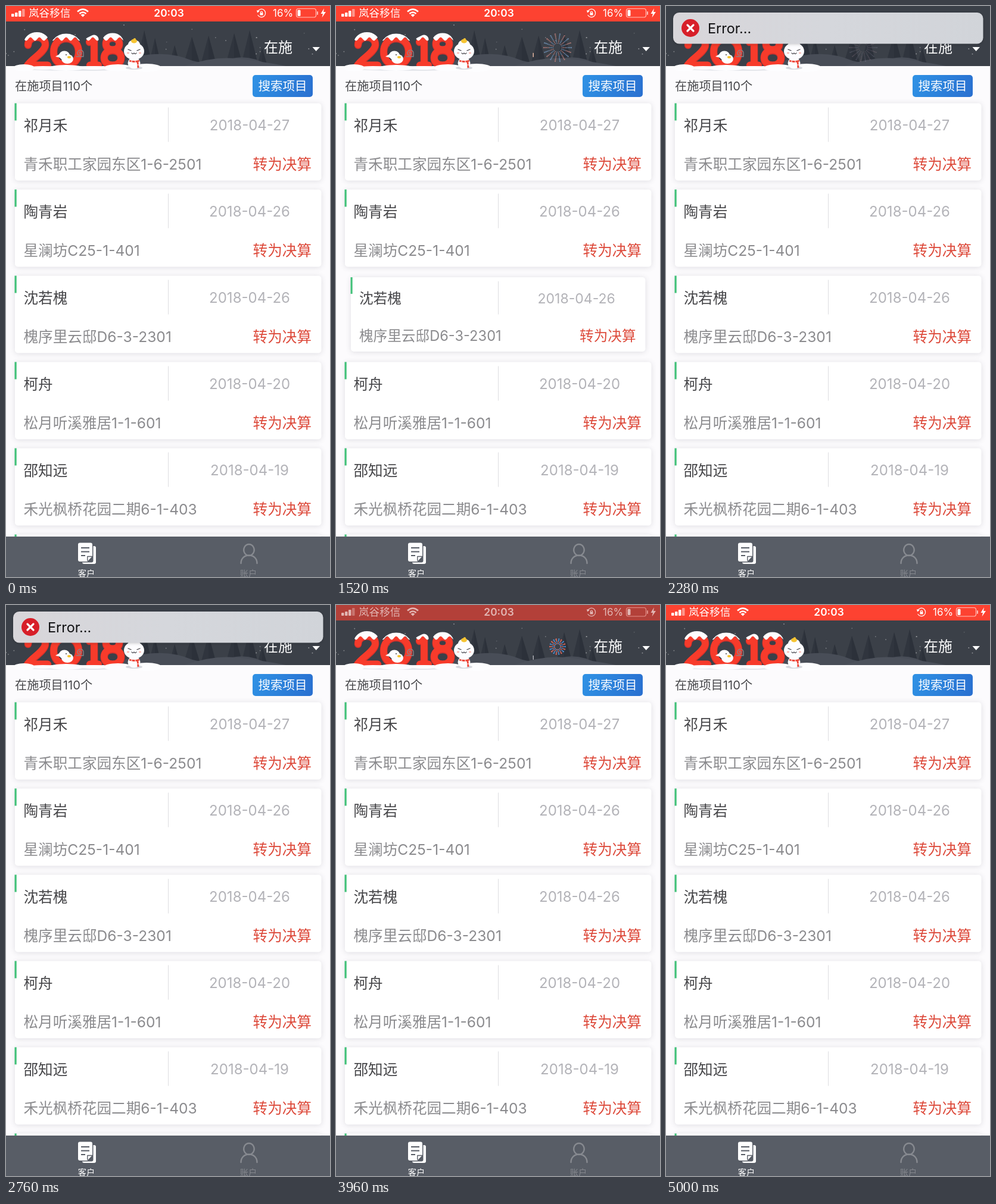
An HTML page with a canvas for the animation above (5.04 s loop, 544 by 960 pixels).

```html
<!DOCTYPE html>
<html lang="zh-CN">
<head>
<meta charset="utf-8">
<title>项目列表</title>
<style>
html, body { margin: 0; width: 100%; height: 100%; overflow: hidden; background: #fcfbfd; }
canvas { display: block; width: 544px; height: 960px; }
</style>
</head>
<body>
<canvas id="stage" width="544" height="960"></canvas>
<script>
const g = document.getElementById('stage').getContext('2d');
const LOOP = 5040, SHOW = 2640, TAU = Math.PI * 2;
const FONT = 'Inter, "Noto Sans CJK SC", "Noto Sans CJK", sans-serif';
const DARK = '#3b4048', RED = '#f73b2b', SNOW = '#fdfdff';

const cards = [
  ['祁月禾', '2018-04-27', '青禾职工家园东区1-6-2501'],
  ['陶青岩', '2018-04-26', '星澜坊C25-1-401'],
  ['沈若槐', '2018-04-26', '槐序里云邸D6-3-2301'],
  ['柯舟', '2018-04-20', '松月听溪雅居1-1-601'],
  ['邵知远', '2018-04-19', '禾光枫桥花园二期6-1-403']
];

const clamp = v => Math.max(0, Math.min(1, v));
const ramp = (t, a, b) => clamp((t - a) / (b - a));
const ease = v => v * v * (3 - 2 * v);
const pulse = (t, a, b, c, d) => ease(ramp(t, a, b)) - ease(ramp(t, c, d));
const noise = n => { const v = Math.sin(n * 127.1 + 3.7) * 43758.5; return v - Math.floor(v); };

function text(s, x, y, size, color, align = 'left', weight = 400) {
  g.font = `${weight} ${size}px ${FONT}`;
  g.fillStyle = color;
  g.textAlign = align;
  g.fillText(s, x, y);
}
function rect(x, y, w, h, color) {
  g.fillStyle = color;
  g.fillRect(x, y, w, h);
}
function round(x, y, w, h, r, color) {
  g.beginPath();
  g.roundRect(x, y, w, h, r);
  g.fillStyle = color;
  g.fill();
}
function oval(x, y, rx, ry, color) {
  g.beginPath();
  g.ellipse(x, y, rx, ry, 0, 0, TAU);
  g.fillStyle = color;
  g.fill();
}
function fill(d, color) {
  g.fillStyle = color;
  g.fill(new Path2D(d));
}
function line(d, color, width, cap = 'round') {
  g.strokeStyle = color;
  g.lineWidth = width;
  g.lineCap = cap;
  g.lineJoin = 'round';
  g.stroke(new Path2D(d));
}
function shaded(color, blur, dy, draw) {
  g.save();
  g.shadowColor = color;
  g.shadowBlur = blur;
  g.shadowOffsetY = dy;
  draw();
  g.restore();
}
function faded(alpha, draw) {
  if (alpha <= 0) return;
  g.save();
  g.globalAlpha *= alpha;
  draw();
  g.restore();
}

function tree(x, top, half) {
  fill(`M${x} ${top}L${x + half} 98H${x - half}Z`, '#30353e');
  fill(`M${x} ${top}L${x + half} 98H${x}Z`, '#2c313a');
}

function firework(t, x, start, inner, outer) {
  const age = t - start;
  if (age < 0 || age > 480) return;
  const reach = 23 * (1 - Math.pow(1 - clamp(age / 230), 1.6));
  const gray = ramp(age, 190, 300);
  faded(1 - 0.5 * gray - 0.5 * ramp(age, 330, 480), () => {
    for (let i = 0; i < 18; i++) {
      const a = i * TAU / 18;
      const dots = Math.max(2, Math.round(reach / 3.2));
      for (let k = 1; k <= dots; k++) {
        const r = reach * (0.22 + 0.78 * k / dots);
        const px = x + Math.cos(a) * r, py = 70 + Math.sin(a) * r;
        const size = 0.8 + 0.4 * k / dots;
        oval(px, py, size, size, (i + (k > dots / 2 ? 1 : 0)) % 2 ? outer : inner);
        if (gray) faded(gray * 0.75, () => oval(px, py, size, size, '#a5a3a9'));
      }
    }
  });
}

function numerals() {
  const shapes = [
    'M37 66C37 48 67 48 66 66C65 78 45 88 36 100H70',
    'M101 55C73 55 73 100 101 100C129 100 129 55 101 55Z',
    'M140 61L148 57V100M141 100H155',
    'M179 54C164 54 164 74 179 74C194 74 194 54 179 54ZM179 75C160 75 160 100 179 100C198 100 198 75 179 75Z'
  ];
  const strokes = (color, width) => shapes.forEach(d => line(d, color, width));
  strokes('#d5302a', 12.5);
  g.save();
  g.translate(0, -1);
  strokes(RED, 11);
  g.beginPath();
  g.moveTo(20, 30);
  for (let x = 20; x <= 206; x += 2) g.lineTo(x, 56.5 + 3 * Math.sin(x * 0.42));
  g.lineTo(206, 30);
  g.clip();
  strokes(SNOW, 15);
  g.restore();
}

function bird() {
  oval(103, 89, 10, 8, SNOW);
  oval(98, 83, 9, 7.5, SNOW);
  fill('M83 85L93 79L95 88Z', SNOW);
  oval(106, 86, 3, 2, '#f6c433');
  oval(101, 82, 1, 1, '#444');
  line('M118 85H130V79C130 72 119 73 120 80C121 85 128 82 126 78C124 76 122 78 124 80', '#8d8588', 1.3);
}

function snowman() {
  oval(215, 104, 14, 3, '#d7d9df');
  oval(215, 96, 10.5, 9.5, SNOW);
  oval(215, 76, 17, 14.5, SNOW);
  oval(215, 65, 10, 8, SNOW);
  oval(215, 59, 5, 3.5, '#f6c433');
  oval(216, 56, 2, 2, '#f6c433');
  line('M205 73L210 75M220 75L225 73M211 79Q213 82 215 79Q217 82 219 79', '#3e3d42', 1.3);
  oval(205, 79, 2, 1.3, '#f9b4ae');
  oval(225, 79, 2, 1.3, '#f9b4ae');
  line('M207 92Q215 95 224 92M221 94L222 104', '#ed4538', 2.8, 'butt');
  line('M211 92V96M217 92V96M220 99H224', '#fff', 1);
}

function header(t) {
  rect(0, 0, 544, 101, DARK);
  for (let i = 0; i < 26; i++)
    faded(0.15 + 0.35 * noise(i + 80), () =>
      oval(noise(i) * 540, 32 + 55 * noise(i + 40), 0.9, 0.9, '#fff'));
  [[232, 41, 13], [250, 54, 10], [283, 66, 9], [312, 52, 14], [340, 50, 13],
   [383, 46, 14], [409, 41, 14], [430, 70, 8]].forEach(p => tree(...p));
  fill('M180 101Q215 82 250 81Q282 79 313 92Q349 101 376 89Q409 80 443 101Z', '#484d57');
  fill('M300 101Q350 83 395 89T470 101Z', '#4c515b');

  const rocket = t - 1250;
  if (rocket > 0 && rocket < 610) {
    const y = 90 - rocket * 0.03;
    rect(330.5, y - 3, 1.5, 7, rocket > 180 ? '#e3b49f' : '#aeb0b5');
  }
  firework(t, 278, 580, '#3da0ed', '#55c59b');
  firework(t, 372, 1230, '#e16859', '#4a91d6');
  firework(t, 331, 1840, '#d7a1b4', '#9a9dbd');

  numerals();
  oval(120, 105, 100, 4, '#e4e6eb');
  for (const [x, w, h] of [[30, 18, 6], [62, 25, 3], [101, 29, 5], [148, 26, 3], [188, 24, 6], [236, 25, 7]])
    oval(x, 104, w, h, SNOW);
  bird();
  snowman();
  text('在施', 433, 78, 24, '#fff');
  fill('M514.5 69H527L520.7 76Z', '#fff');
}

function statusBar() {
  rect(0, 0, 544, 26, '#fd4231');
  [5, 7, 10, 13].forEach((h, i) =>
    faded(i < 3 ? 1 : 0.45, () => round(9 + i * 6, 18 - h, 4.5, h, 1, '#fff')));
  text('岚谷移信', 38, 18, 17.6, '#fff');
  line('M120 9.5Q129 1.5 138 9.5M123.5 13Q129 8 134.5 13', '#fff', 2.6, 'butt');
  fill('M125.5 15Q129 12 132.5 15L129 18.5Z', '#fff');
  text('20:03', 273.5, 18, 17.4, '#fff', 'center', 600);
  line('M423 8.5A6.8 6.8 0 1 1 423 15.5M427.5 11.5V10.5A1.5 1.5 0 0 1 430.5 10.5V11.5', '#fff', 1.2);
  fill('M421 7L426 8.5L422 11.5Z', '#fff');
  rect(426.5, 11.5, 5, 4, '#fff');
  text('16%', 448, 18, 17, '#fff');
  g.strokeStyle = '#ffc3bc';
  g.lineWidth = 1.2;
  g.beginPath();
  g.roundRect(487.5, 4.5, 33, 14.5, 3.5);
  g.stroke();
  round(522, 9, 2, 6, 1, '#ffc3bc');
  round(489.5, 6.5, 5, 10.5, 1.5, '#fff');
  fill('M534 4L528.5 13H532L530.5 19.5L537 10H533Z', '#fff');
}

function panel(y) {
  shaded('rgba(70,70,90,.17)', 10, 1, () => round(15, y, 514.5, 130, 5, '#fff'));
  rect(14.5, y, 3.2, 29, '#41c178');
}

function card([name, date, address], y, scale) {
  g.save();
  g.translate(272, y + 65);
  g.scale(scale, scale);
  g.translate(-272, -65);
  panel(0);
  rect(272, 7, 1, 58, '#dcdce0');
  text(name, 29.5, 46, 24.6, '#464649');
  text(date, 409, 45.5, 24, '#b3b3b8', 'center');
  text(address, 29.5, 111, 24.6, '#8b8b8e');
  text('转为决算', 513, 111, 24.6, '#dd4a3b', 'right');
  g.restore();
}

function tabBar() {
  rect(0, 892, 544, 68, '#585d66');
  round(128, 908, 23, 30, 3, '#fff');
  round(120, 901, 26.5, 34.5, 3, '#585d66');
  fill('M124 902.5H142Q145 902.5 145 905.5V925L136.5 934H124Q121 934 121 931V905.5Q121 902.5 124 902.5Z', '#fff');
  line('M126 911H140M126 917.5H140M126 924H133', '#585d66', 1.8, 'butt');
  line('M136.8 933V925.5H145', '#585d66', 1.4, 'butt');
  text('客户', 135, 958.5, 14.2, '#fff', 'center');
  line('M408 905A8.7 9.5 0 1 1 407.9 905ZM394.5 937C394.5 919 421.5 919 421.5 937', '#878a90', 2.4);
  text('账户', 407, 958.5, 14.2, '#85888e', 'center');
}

function toast(dy) {
  g.save();
  g.translate(0, dy);
  const shade = g.createLinearGradient(12, 0, 532, 0);
  shade.addColorStop(0, '#d8d6da');
  shade.addColorStop(0.5, '#d5d7dc');
  shade.addColorStop(1, '#d1d4d9');
  shaded('rgba(0,0,0,.2)', 5, 1, () => round(12, 11, 520.5, 52.5, 10, shade));
  oval(41, 37, 15, 15, '#d71f29');
  line('M36 32L46 42M46 32L36 42', '#fff', 3.2);
  text('Error...', 70, 45.5, 23.4, '#101012');
  g.restore();
}

function draw(t) {
  rect(0, 0, 544, 960, '#fcfbfd');
  header(t % SHOW);
  faded(1 - ramp(t, 1760, 2000) + ramp(t, 3800, 4060), statusBar);

  text('在施项目110个', 15, 142, 20.2, '#47474a');
  const blue = g.createLinearGradient(414, 116, 515, 153);
  blue.addColorStop(0, '#2f92e5');
  blue.addColorStop(1, '#2a70d0');
  round(414, 116, 101, 37, 5, blue);
  text('搜索项目', 464.5, 142, 20.5, '#fff', 'center');

  const press = pulse(t, 1400, 1510, 1620, 1750);
  cards.forEach((c, i) => card(c, 163.5 + i * 145, i === 2 ? 1 - 0.039 * press : 1));
  panel(888.5);
  tabBar();

  const shown = pulse(t, 1780, 2100, 3450, 3760);
  if (shown > 0) toast(-76 * (1 - shown));
}

function tick(now) {
  draw(now % LOOP);
  requestAnimationFrame(tick);
}
requestAnimationFrame(tick);
</script>
</body>
</html>
```
